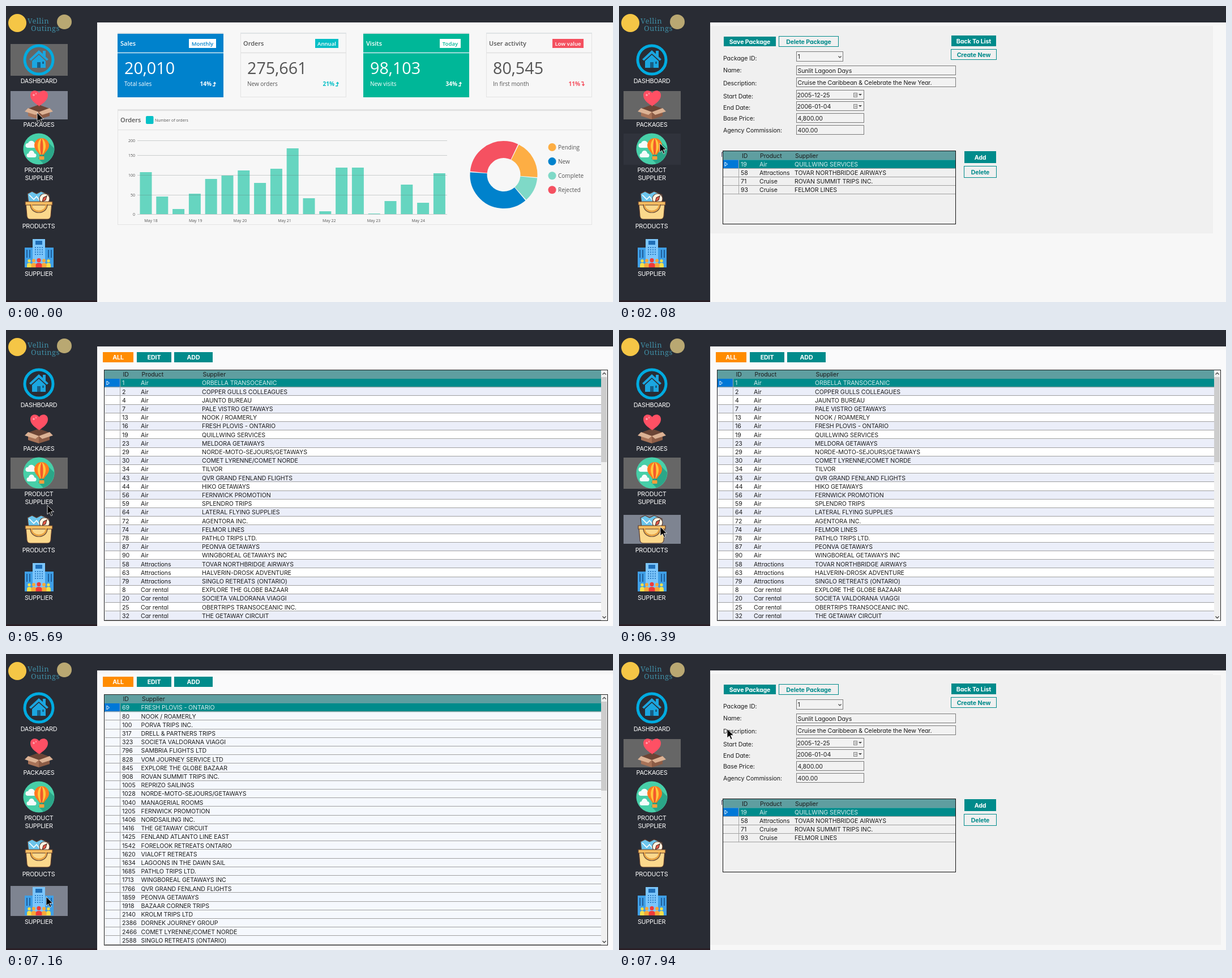
Animation, 1072 px wide and 522 px high, one loop 8000 ms. Source, as an HTML page:

```html
<!DOCTYPE html>
<html lang="en">
<head>
<meta charset="utf-8">
<title>Travel back office</title>
<style>
html, body { margin: 0; width: 100%; height: 100%; overflow: hidden; background: #292c34; }
svg { position: absolute; left: 0; top: 0; width: 1072px; height: 522px; }
text { font: 10.6px Inter, Lato, sans-serif; font-feature-settings: "cv11"; letter-spacing: -.1px; fill: #1c1c1c; white-space: pre; }
.mid { text-anchor: middle; }
.nav text { font-size: 10.8px; letter-spacing: -.25px; fill: #fff; text-anchor: middle; }
.nav .brand { font: 13px "Noto Serif", serif; fill: #3f8ca3; letter-spacing: .4px; text-anchor: start; }
.b { font-weight: 700; }
.w { fill: #fff; }
.teal { fill: #008b8b; }
.sel { fill: #d9ecec; }
#dash text { font: 10px "Open Sans", sans-serif; letter-spacing: 0; fill: #555; }
#dash .h { font-size: 11px; font-weight: 600; }
#dash .n { font-size: 28.7px; }
#dash .s { font-size: 7px; }
#dash .k { font-weight: 700; }
#dash .tag { font-weight: 600; font-size: 9.6px; text-anchor: middle; }
#dash .w { fill: #fff; }

svg.page, .late, .wide, .stub { visibility: hidden; }
.page, .late, .wide, .stub, .cell, #cursor { animation: 8s step-end infinite; }
#dash { animation-name: dash; }
#pack { animation-name: pack; }
#ps { animation-name: ps; }
#prod { animation-name: prod; }
#sup { animation-name: sup; }
.late { animation-name: late; }
.wide { animation-name: wide; }
.stub { animation-name: stub; }
.cell { fill: transparent; }
#c0 { animation-name: c0; }
#c1 { animation-name: c1; }
#c2 { animation-name: c2; }
#c3 { animation-name: c3; }
#c4 { animation-name: c4; }
#cursor { animation-name: cursor; }

@keyframes dash { 0% { visibility: visible } 3.375%, 100% { visibility: hidden } }
@keyframes pack { 0%, 69.625% { visibility: hidden } 3.375%, 97.375%, 100% { visibility: visible } }
@keyframes ps {
  0%, 81.375%, 100% { visibility: hidden; clip-path: none }
  68.125% { visibility: visible; clip-path: inset(0 0 163px 0) }
  69.625% { visibility: visible; clip-path: none }
}
@keyframes stub { 0%, 69.625%, 100% { visibility: hidden } 68.125% { visibility: visible } }
@keyframes late { 0%, 81.375%, 100% { visibility: hidden } 69.625% { visibility: visible } }
@keyframes prod { 0%, 89.5%, 100% { visibility: hidden } 81.375% { visibility: visible } }
@keyframes sup { 0%, 97.375%, 100% { visibility: hidden } 89.5% { visibility: visible } }
@keyframes wide { 0% { visibility: hidden } 97.375%, 100% { visibility: visible } }
@keyframes c0 { 0% { fill: #666 } 3.375%, 100% { fill: transparent } }
@keyframes c1 {
  0%, 95.875% { fill: #7e8491 } 22.5%, 99.25%, 100% { fill: #666 } 68.125% { fill: transparent }
}
@keyframes c2 {
  0%, 81.375%, 100% { fill: transparent } 24.125% { fill: #30333c } 68.125% { fill: #777 } 71.125% { fill: #666 }
}
@keyframes c3 { 0%, 87.75%, 100% { fill: transparent } 79.875% { fill: #7e8491 } 84.625% { fill: #666 } }
@keyframes c4 { 0%, 97.375%, 100% { fill: transparent } 86.125% { fill: #7e8491 } 91.375% { fill: #666 } }
@keyframes cursor {
  0% { transform: translate(55px, 188px) }
  22.5% { transform: translate(62px, 205px) }
  24.125% { transform: translate(72px, 236px) }
  26% { transform: translate(72px, 242px) }
  71.125% { transform: translate(73px, 309px) }
  73% { transform: translate(73px, 313px) }
  74.625% { transform: translate(73px, 318px) }
  78% { transform: translate(73px, 328px) }
  79.875% { transform: translate(73px, 347px) }
  84.625% { transform: translate(72px, 385px) }
  86.125% { transform: translate(71px, 428px) }
  92.875% { transform: translate(72px, 360px) }
  94.375% { transform: translate(68px, 270px) }
  95.875% { transform: translate(64px, 188px) }
  99.25%, 100% { transform: translate(191px, 132px) }
}
</style>
</head>
<body>
<svg><path fill="#f7f7f7" d="M161 29H1072V522H161Z"/></svg>
<svg class="page" id="dash"></svg>
<svg class="page" id="pack"></svg>
<svg class="page" id="ps"></svg>
<svg class="page" id="prod"></svg>
<svg class="page" id="sup"></svg>

<svg class="nav">
  <path fill="#2a1f26" d="M0 519H161V522H0Z"/>
  <circle cx="20" cy="30" r="16" fill="#f5c646"/>
  <circle cx="103" cy="28" r="13" fill="#b9a872"/>
  <text class="brand" x="38" y="31">Vellin</text>
  <text class="brand" x="44" y="44">Outings</text>

  <rect class="cell" id="c0" x="8" y="67" width="101" height="56"/>
  <rect class="cell" id="c1" x="8" y="150" width="101" height="50"/>
  <rect class="cell" id="c2" x="8" y="225" width="101" height="55"/>
  <rect class="cell" id="c3" x="8" y="326" width="101" height="51"/>
  <rect class="cell" id="c4" x="8" y="409" width="101" height="53"/>

  <circle cx="58" cy="95" r="25" fill="none" stroke="#00abe0" stroke-width="5"/>
  <g fill="#1ba6e0">
    <path d="M41 94L58 78 65 84.5V79H70V89.500L75 94 72 96.500 58 84 44 96.500Z"/>
    <path d="M46 97L58 86 70 97V109H46Z"/>
  </g>
  <path fill="#175f86" d="M55 99H61V109H55ZM64 98h3v4h-3z"/>

  <path fill="#ff5064" d="M58.500 177C51 171 43 166 43 157.500 43 148 54 147 58.500 153.500 63 147 74 148 74 157.500 74 166 66 171 58.500 177Z"/>
  <path stroke="#ffc2c8" fill="none" d="M49 155v4m-2-2h4m2-4v3"/>
  <path fill="#6b4536" d="M39 181L58 174 77 181 58 188Z"/>
  <path fill="#a87358" d="M39 181L58 187V200L39 194Z"/>
  <path fill="#8c5c46" d="M77 181L58 187V200L77 194Z"/>
  <path fill="#dcb294" d="M39 180L58 187 52 192 33 186ZM77 180L58 187 64 192 83 186Z"/>
  <path fill="#ff5064" d="M51 168H66L58.500 177Z"/>

  <circle cx="58" cy="252" r="27.500" fill="#47cfa8"/>
  <path fill="#2ba688" d="M74 240L85 251A27.500 27.500 0 0 1 66 278L57 269Z"/>
  <path fill="#f4fbfa" d="M38 250a4 4 0 0 1 1-8 6 6 0 0 1 11-1 4.500 4.500 0 0 1 2 9zM40 267a3.500 3.500 0 0 1 0-7 5 5 0 0 1 10 0 3.500 3.500 0 0 1 0 7z"/>
  <path fill="#ff7a1f" d="M63 233C71 233 76 239 76 246 76 253 69 258 67 262H59C57 258 50 253 50 246 50 239 55 233 63 233Z"/>
  <path fill="#ffc83d" d="M63 233C68 236 70 241 70 247 70 253 67 258 65 262H61C59 258 56 253 56 247 56 241 58 236 63 233Z"/>
  <path fill="#f4592b" d="M63 233C66 238 66.500 254 64 262H62C59.500 254 60 238 63 233Z"/>
  <path stroke="#8b5a2b" d="M60 262v4m6-4v4"/>
  <rect x="58.500" y="265" width="9" height="6" rx="1" fill="#f0a03c"/>

  <g stroke="#5b3a2c" stroke-width="1.200">
    <path fill="#6cc5ec" d="M38 331L46 327 54 331 62 327 76 333V350H40Z"/>
    <path fill="none" stroke="#fff" stroke-width="1.600" d="M41 333l8 8 5-5 7 9"/>
    <circle cx="68" cy="340" r="9" fill="#fff4e2"/>
    <path fill="#f2584a" d="M72 335L70 342 64 345 66 338Z"/>
    <path fill="#fbd88c" d="M35 347H81L79 371Q78 376 73 376H43Q38 376 37 371Z"/>
    <path fill="#f6bd62" d="M34 345H82V351H34Z"/>
    <path fill="none" stroke="#e9a443" stroke-width="2.500" d="M45 350C45 366 71 366 71 350"/>
    <path fill="none" d="M43 350C43 369 73 369 73 350"/>
  </g>

  <path fill="#3f9fe6" d="M33 426H84V461H33Z"/>
  <path fill="#7cc6fb" d="M47 411H69V461H47Z"/>
  <path fill="#1f6fb8" d="M52 414H64V421H52Z"/>
  <path stroke="#1f5f9c" stroke-width="2" d="M37 430v14m5-14v14M75 430v14m5-14v14"/>
  <path stroke="#2f7fc6" stroke-width="2" stroke-dasharray="2 2" d="M51 426h15M51 430h15M51 434h15M51 438h15"/>
  <g id="people"></g>

  <text x="58" y="136">DASHBOARD</text>
  <text x="58" y="213">PACKAGES</text>
  <text x="58" y="293">PRODUCT</text>
  <text x="58" y="307">SUPPLIER</text>
  <text x="57.500" y="392">PRODUCTS</text>
  <text x="57.500" y="476">SUPPLIER</text>
  <path id="cursor" fill="#000" stroke="#fff" stroke-width=".8" d="M0 0V16L3.800 12.600 6.600 18.600 9 17.500 6.300 11.600H11.400Z"/>
</svg>

<script>
const $ = id => document.getElementById(id);
const text = (x, y, s, cls = '') => `<text x="${x}" y="${y}" class="${cls}">${s}</text>`;
const rect = (x, y, w, h, fill) => `<rect x="${x}" y="${y}" width="${w}" height="${h}" fill="${fill}"/>`;
const box = (x, y, w, h, stroke, fill = 'none') =>
  `<rect x="${x + .5}" y="${y + .5}" width="${w - 1}" height="${h - 1}" fill="${fill}" stroke="${stroke}"/>`;
const path = (d, stroke, w = 1, fill = 'none') =>
  `<path d="${d}" stroke="${stroke}" stroke-width="${w}" fill="${fill}"/>`;
const group = (cls, s) => `<g class="${cls}">${s}</g>`;
const TEAL = '#008b8b';
const PITCH = 15.2;

function solid(x, y, w, h, s, fill = TEAL) {
  return rect(x, y, w, h, fill) + text(x + w / 2, y + h / 2 + 4, s, 'b w mid');
}
function outline(x, y, w, h, s) {
  return box(x, y, w, h, TEAL) + text(x + w / 2, y + h / 2 + 4, s, 'b teal mid');
}

// Grid rows: the first one is selected
function rows(list, x, y, right, cols, gutter) {
  let s = rect(x, y, gutter - x, PITCH, '#0078d7') + rect(gutter, y, right - gutter, PITCH, TEAL);
  s += path(`M${x + 4} ${y + 4}l4.500 3.500-4.500 3.500z`, '#fff');
  list.forEach((row, i) => {
    const top = y + i * PITCH, line = Math.round(top + PITCH) - .5;
    s += path(`M${x + 1} ${line}H${right}`, '#a0a0a0');
    row.split('|').forEach((c, j) => s += text(cols[j], (top + 11.4).toFixed(1), c, i ? '' : 'sel'));
  });
  return s + path(`M${gutter + .5} ${y}v${list.length * PITCH}`, '#a8a8a8');
}

function tablePage({ head, cols, list, fill, dy = 0, stripe, thumb }) {
  const right = thumb ? 1051 : 1062, h = Math.min(list.length * PITCH, 426);
  let s = rect(161, 35, 911, thumb ? 487 : 487, '#fafafb');
  s += solid(171, 39, 54, 18, 'ALL', '#ff8c00') + solid(231, 39, 61, 18, 'EDIT') + solid(297, 39, 68, 18, 'ADD');
  s += rect(174, 70, 888, 442, '#fbfbfd') + rect(174, 86, right - 174, h, fill);
  if (stripe) s += group('late', list.map((_, i) =>
    rect(174, 86 + i * PITCH, 877, PITCH, i % 2 ? '#ebeef9' : '#fff')).join(''));
  s += rect(174, 70, right - 174, 16, '#5f9ea0') + head.map((t, i) => text(cols[i] + 1.5, 82, t)).join('');
  s += rows(list, 174, 86, right, cols, 201);
  let frame = rect(161, 512, 911, 10, '#fafafb');
  if (thumb) frame += rect(1051, 71, 11, 441, '#f0f0f0') + rect(1051, 83, 10, thumb, '#cdcdcd') +
    path('M1053.500 78.500l3-3 3 3M1053.500 505l3 3 3-3', '#444', 1.3);
  frame += box(173, 70, 890, 443, '#222');
  s += stripe ? group('late', frame) : frame;
  return `<g transform="translate(0 ${dy})">${s}</g>`;
}

// Dashboard
function card(x, title, tag, num, note, pct, color, full, down) {
  const w = full ? ' w' : '', edge = full ? color : '#e3e3e3';
  const [tx, tw] = tag;
  let s = box(x, 48, 187, 113, edge, full ? color : '#f7f7f7') + rect(x, 47, 187, 2, '#dfe3e5');
  s += path(`M${x} 82.500h187`, full ? '#d5e8f0' : '#e0e0e0', 1.4);
  s += rect(tx, 58, tw, 16, full ? '#fff' : color);
  s += `<text x="${tx + tw / 2}" y="69.500" class="tag" style="fill:${full ? color : '#fff'}">${tag[2]}</text>`;
  s += text(x + 5, 70, title, 'h' + w) + text(x + 12, 120, num, 'n' + w) + text(x + 12, 141, note, w);
  const ink = full ? '#fff' : color;
  s += `<text x="${x + 166}" y="141" class="k" text-anchor="end" style="fill:${ink}">${pct}</text>`;
  return s + path(`M${x + 168} ${down ? 134 : 141}h3.500v${down ? 6 : -6}m-2 ${down ? -2 : 2}l2 ${down ? 2.5 : -2.5} 2 ${down ? -2.5 : 2.5}`, ink, 1.3);
}

function dashboard() {
  let s = card(197, 'Sales', [323, 48, 'Monthly'], '20,010', 'Total sales', '14%', '#0082cc', true) +
    card(414, 'Orders', [546, 41, 'Annual'], '275,661', 'New orders', '21%', '#06bfc6') +
    card(631, 'Visits', [766, 37, 'Today'], '98,103', 'New visits', '34%', '#00b798', true) +
    card(848, 'User activity', [965, 55, 'Low value'], '80,545', 'In first month', '11%', '#f4505f', false, true);
  s += box(197, 183, 838, 203, '#e4e4e4') + rect(197, 182, 838, 3, '#e2e2e2') + path('M197 218.500h838', '#e0e0e0');
  s += text(202, 205, 'Orders', 'h') + '<rect x="247" y="194" width="13.500" height="14" rx="2" fill="#06c1c7"/>' +
    text(263, 204, 'Number of orders', 's');
  const tops = [293, 336, 358, 331, 305, 299, 290, 312, 287, 251, 339, 362, 285, 285, 366, 344, 315, 347, 295];
  tops.forEach((y, i) => s += rect(236.5 + i * 28.8, y, 21, 367 - y, '#66d5c0'));
  [237, 263, 298, 333, 367].forEach((y, i) => {
    s += path(`M232 ${y + .5}H779`, 'rgba(90,100,100,.28)');
    s += `<text x="228" y="${y + 3}" class="s" text-anchor="end">${200 - i * 50}</text>`;
  });
  for (let i = 0; i < 7; i++) s += text(256 + i * 78.7, 381, 'May ' + (18 + i), 's mid');
  const slices = [[26, 95, '#fdae44', 'Pending'], [139, 275, '#0082cc', 'New'],
    [95, 139, '#7fd9c7', 'Complete'], [275, 386, '#f55161', 'Rejected']];
  slices.forEach(([a, b, color, name], i) => {
    s += `<circle cx="879" cy="297.500" r="44.500" fill="none" stroke="${color}" stroke-width="30" pathLength="360"
      stroke-dasharray="${b - a - 1.6} 360" transform="rotate(${a - 89.2} 879 297.500)"/>`;
    s += `<circle cx="964.500" cy="${249 + i * 25.1}" r="7" fill="${color}"/>` + text(975, 252.5 + i * 25.1, name);
  });
  return s;
}

// Package form
function packageForm() {
  let s = rect(161, 35, 888, 366, '#f0f0f0') + `<rect class="wide" x="161" y="37" width="902" height="476" fill="#f0f0f0"/>`;
  s += solid(185, 54, 92, 17, 'Save Package') + outline(282, 53, 106, 19, 'Delete Package') +
    solid(587, 52, 79, 19, 'Back To List') + outline(586, 76, 81, 19, 'Create New') +
    solid(610, 256, 56, 21, 'Add') + outline(609, 282, 58, 21, 'Delete');
  const fields = [
    ['Package ID:', 96, 80, 83, '1'],
    ['Name:', 117, 105, 282, 'Sunlit Lagoon Days'],
    ['Description:', 140, 126, 282, 'Cruise the Caribbean &amp; Celebrate the New Year.'],
    ['Start Date:', 163, 148, 120, '2005-12-25'],
    ['End Date:', 183, 168, 120, '2006-01-04'],
    ['Base Price:', 202, 189, 120, '4,800.00'],
    ['Agency Commission:', 223, 210, 120, '400.00']];
  fields.forEach(([label, base, y, w, value], i) => {
    const date = i == 3 || i == 4;
    s += text(184, base, label) + box(313, y, w, i ? 17 : 18, '#7a7a7a', '#f2f2f2') + text(date ? 314.5 : 315.5, y + 13, value);
    if (date) s += box(414, y + 5, 7, 8, '#888', '#ddd') + path(`M416 ${y + 9}h4`, '#888') +
      path(`M423 ${y + 7}h6l-3 3z`, 'none', 0, '#444');
  });
  s += path('M387.500 88.500l2.500 2.500 2.500-2.500', '#444', 1.2) + path('M181.500 258v8m0-7.500h2', '#446');
  s += rect(184, 256, 411, 15.5, '#5f9ea0') + text(217, 268, 'ID') + text(249, 268, 'Product') + text(311, 268, 'Supplier');
  s += rows(['19|Air|QUILLWING SERVICES', '58|Attractions|TOVAR NORTHBRIDGE AIRWAYS',
    '71|Cruise|ROVAN SUMMIT TRIPS INC.', '93|Cruise|FELMOR LINES'], 183, 271.4, 595, [215, 248, 310], 211);
  return s + box(183, 255, 412, 130, '#111');
}

const linked = `1|Air|ORBELLA TRANSOCEANIC
2|Air|COPPER GULLS COLLEAGUES
4|Air|JAUNTO BUREAU
7|Air|PALE VISTRO GETAWAYS
13|Air|NOOK / ROAMERLY
16|Air|FRESH PLOVIS - ONTARIO
19|Air|QUILLWING SERVICES
23|Air|MELDORA GETAWAYS
29|Air|NORDE-MOTO-SEJOURS/GETAWAYS
30|Air|COMET LYRENNE/COMET NORDE
34|Air|TILVOR
43|Air|QVR GRAND FENLAND FLIGHTS
44|Air|HIKO GETAWAYS
56|Air|FERNWICK PROMOTION
59|Air|SPLENDRO TRIPS
64|Air|LATERAL FLYING SUPPLIES
72|Air|AGENTORA INC.
74|Air|FELMOR LINES
78|Air|PATHLO TRIPS LTD.
87|Air|PEONVA GETAWAYS
90|Air|WINGBOREAL GETAWAYS INC
58|Attractions|TOVAR NORTHBRIDGE AIRWAYS
63|Attractions|HALVERIN-DROSK ADVENTURE
79|Attractions|SINGLO RETREATS (ONTARIO)
8|Car rental|EXPLORE THE GLOBE BAZAAR
20|Car rental|SOCIETA VALDORANA VIAGGI
25|Car rental|OBERTRIPS TRANSOCEANIC INC.
32|Car rental|THE GETAWAY CIRCUIT`.split('\n');

const products = ['Air', 'Attractions', 'Car rental', 'Cruise', 'Hotel', 'Motor Coach', 'Railroad', 'Tours',
  'Travel Insurance', 'Yacht/Boat Charters'].map((p, i) => `${i + 1}|${p}`);

const suppliers = `69|FRESH PLOVIS - ONTARIO
80|NOOK / ROAMERLY
100|PORVA TRIPS INC.
317|DRELL &amp; PARTNERS TRIPS
323|SOCIETA VALDORANA VIAGGI
796|SAMBRIA FLIGHTS LTD
828|VOM JOURNEY SERVICE LTD
845|EXPLORE THE GLOBE BAZAAR
908|ROVAN SUMMIT TRIPS INC.
1005|REPRIZO SAILINGS
1028|NORDE-MOTO-SEJOURS/GETAWAYS
1040|MANAGERIAL ROOMS
1205|FERNWICK PROMOTION
1406|NORDSAILING INC.
1416|THE GETAWAY CIRCUIT
1425|FENLAND ATLANTO LINE EAST
1542|FORELOOK RETREATS ONTARIO
1620|VIALOFT RETREATS
1634|LAGOONS IN THE DAWN SAIL
1685|PATHLO TRIPS LTD.
1713|WINGBOREAL GETAWAYS INC
1766|QVR GRAND FENLAND FLIGHTS
1859|PEONVA GETAWAYS
1918|BAZAAR CORNER TRIPS
2140|KROLM TRIPS LTD
2386|DORNEK JOURNEY GROUP
2466|COMET LYRENNE/COMET NORDE
2588|SINGLO RETREATS (ONTARIO)`.split('\n');

$('dash').innerHTML = dashboard();
$('pack').innerHTML = packageForm();
$('ps').innerHTML = tablePage({
  head: ['ID', 'Product', 'Supplier'], cols: [205, 238, 346], list: linked, fill: '#f5f7fc', stripe: true, thumb: 150
}) + group('stub', rect(235, 344, 816, 15, '#f5f7fc') + path('M594.500 344v15', '#111') +
  path('M175 358.500h60', '#a0a0a0') + path('M184 69.500h93m5 0h106m199 0h79', TEAL));
$('prod').innerHTML = tablePage({ head: ['ID', 'Product Name'], cols: [205, 238], list: products, fill: '#fbfcfe', dy: 1 });
$('sup').innerHTML = tablePage({ head: ['ID', 'Supplier'], cols: [205, 238.5], list: suppliers, fill: '#f5f8fd', dy: 1, thumb: 157 });
$('people').innerHTML = [[41, 2.6, '#f6e04b'], [75, 2.6, '#f6e04b'], [49, 3, '#f9a83a'], [67, 3, '#f9a83a'], [58, 3.6, '#ef3b3b']]
  .map(([x, r, c]) => `<circle cx="${x}" cy="${452 - r}" r="${r}" fill="${c}"/>` +
    `<path fill="${c}" d="M${x - r * 1.5} 461v-4q0-4 ${r * 1.5}-4t${r * 1.5} 4v4z"/>`).join('');
</script>
</body>
</html>
```
